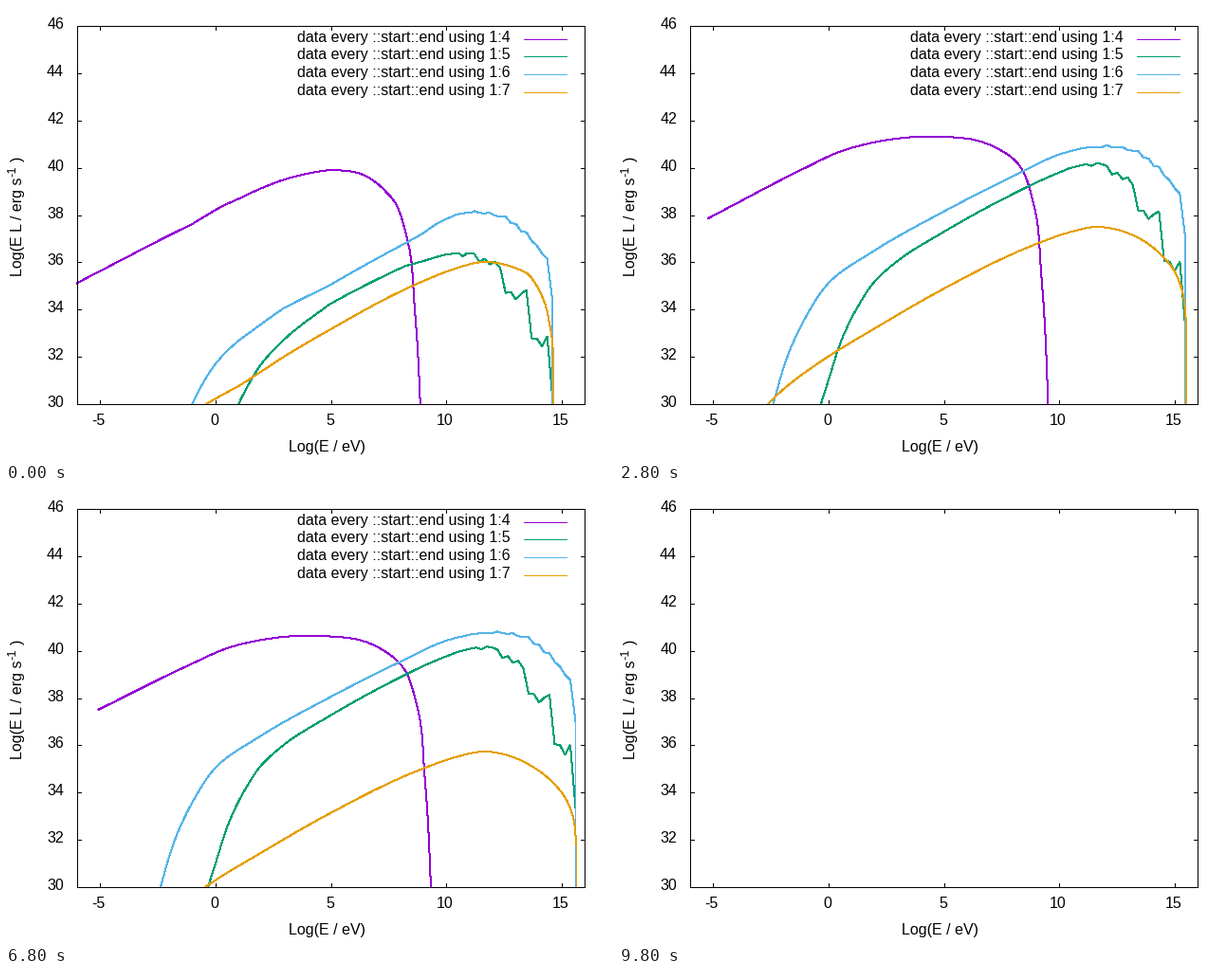
Animation of 640 by 480 pixels, one loop 10 s. Source, as a matplotlib script:

```python
import numpy as np
import matplotlib.pyplot as plt
from matplotlib.animation import FuncAnimation

W, H, DPI = 640, 480, 100
PX = 72 / DPI
FRAMES, STEP = 50, 200
LEFT, RIGHT, TOP, BOTTOM = 74, 609, 20, 419
RISE, REST = 6, 21        # end of the opening rise, frame of the rest shape
GRID = 5.5                # energy step of the ragged edges
EDGE = 598

plt.rcParams.update({"font.family": "Liberation Sans",
                     "font.size": 16 * PX,
                     "path.simplify": False})


def spline(*knots, parts=6):
    """Smooth path through knots given as x, y, x, y, ..."""
    p = np.reshape(knots, (-1, 2)).astype(float)
    t = np.r_[0, np.cumsum(np.hypot(*np.diff(p, axis=0).T))]
    m = np.gradient(p, t, axis=0)
    out = []
    for i, h in enumerate(np.diff(t)):
        s = np.linspace(0, 1, parts, endpoint=False)[:, None]
        out.append((1 + 2 * s) * (1 - s) ** 2 * p[i] + s * (1 - s) ** 2 * h * m[i]
                   + s * s * (3 - 2 * s) * p[i + 1] + s * s * (s - 1) * h * m[i + 1])
    return np.vstack(out + [p[-1:]])


def ragged(*ys):
    xs = EDGE - GRID * np.arange(len(ys))[::-1]
    return np.column_stack([xs, ys])


def edge_shift(n):
    return 9.6 * np.log10((n + 0.1) / (REST + 0.1))


def settle(n):
    return np.exp((RISE - n) / 4)


def fade(n):
    return max(n - REST, 0)


def bend(a, b):
    return lambda n: a * (n - REST) + b * (n - REST) ** 2


def sink(a, b):
    return lambda n: a * settle(n) + b * fade(n)


class Curve:
    """A rest shape, its drop at the start and its later drift."""

    SPOTS = 195, 245, 292, 341, 420, 500, 598

    def __init__(self, color, path, drop, low, high, ramp, dx=edge_shift):
        self.color, self.path, self.drop = color, path, drop
        self.low, self.high, self.ramp, self.dx = low, high, ramp, dx

    def at(self, n):
        x, y = self.path.T
        u = min(1, np.log1p(10 * n) / np.log1p(10 * RISE))
        late = max(n, RISE)
        low, high = self.low(late), self.high(late)
        drift = low + (high - low) * (x - 100) / 400
        dy = (1 - u) * np.interp(x, self.SPOTS, self.drop) + u * drift
        begin, width = self.ramp
        dx = self.dx(n) * np.clip((x - begin) / width, 0, 1)
        start = edge_shift(n) * np.clip((120 - x) / 25, 0, 1)
        x, y = x + dx + start, y + dy - 0.52 * start
        return np.r_[x, x[-1]], np.r_[y, H + 20]


def cutoff_shift(n):
    u = min(1, np.log1p(10 * n) / np.log1p(10 * RISE))
    return -14.5 * (1 - u) - settle(max(n, RISE)) * u - 0.3 * fade(n)


purple = Curve(
    "#9400d3",
    spline(95, 225, 195, 174, 232, 157, 268, 147.5, 330, 142, 390, 151,
           420, 171, 437, 215, 445, 290, 454, 470),
    (56, 50, 39, 30, 30, 30, 30),
    bend(0.44, 0.0158), bend(1.02, 0.0127), (365, 50), cutoff_shift)

green = Curve(
    "#009e73",
    np.vstack([
        spline(208, 432, 220, 394, 236, 346, 252, 314, 268, 290, 292, 268,
               341, 237, 414, 197, 445, 182, 475, 169.5),
        ragged(165, 167, 164, 165, 167, 176, 174, 181, 179, 187, 214, 214,
               223, 218, 215, 267, 268, 278, 268, 334)]),
    (92, 92, 84, 77, 80, 97, 79),
    sink(11, 0.14), sink(9, 0.13), (440, 75))

blue = Curve(
    "#56b4e9",
    np.vstack([
        spline(158, 432, 181, 358, 195, 329, 220, 291, 268, 257, 341, 216,
               420, 176, 463, 156, 489, 149),
        ragged(148, 148, 148, 146, 148, 148.5, 148, 151, 152, 152, 159, 160,
               168, 169, 178, 183, 191.5, 197, 241)]),
    (92, 81, 76, 78, 74, 70, 69),
    sink(11, 0.2), sink(3, 0.28), (440, 75))

orange = Curve(
    "#e69f00",
    spline(128, 465, 171, 419, 220, 383, 268, 354, 341, 312, 438, 265,
           475, 252, 503, 246.5, 536, 253, 572, 276, 588, 296, 595, 314,
           599, 345),
    (29, 33, 30, 29, 26, 23, 22),
    bend(2.04, 0.0159), bend(2.1, 0.0159), (550, 45))

curves = purple, green, blue, orange

fig = plt.figure(figsize=(W / DPI, H / DPI), dpi=DPI, facecolor="white")


def pixel_axes(x0, y0, x1, y1):
    ax = fig.add_axes([x0 / W, 1 - y1 / H, (x1 - x0) / W, (y1 - y0) / H])
    ax.set_xlim(x0, x1)
    ax.set_ylim(y1, y0)
    ax.axis("off")
    return ax


plot = pixel_axes(LEFT, TOP, RIGHT + 1, BOTTOM + 1)
stage = pixel_axes(0, 0, W, H)


def stroke(ax, xs, ys, color="black"):
    return ax.plot(np.add(xs, 0.5), np.add(ys, 0.5), color=color, lw=PX,
                   antialiased=False, solid_joinstyle="miter",
                   solid_capstyle="projecting")[0]


def label(x, y, s, ha="center", **kw):
    return stage.text(x, y, s, ha=ha, va="baseline", **kw)


lines = [stroke(plot, [], [], c.color) for c in curves]

# Border, ticks and tick labels
stroke(stage, [LEFT, RIGHT, RIGHT, LEFT, LEFT], [TOP, TOP, BOTTOM, BOTTOM, TOP])
for v in range(-5, 16, 5):
    x = round(LEFT + (v + 6) * (RIGHT - LEFT) / 22)
    stroke(stage, [x, x], [BOTTOM - 4, BOTTOM])
    stroke(stage, [x, x], [TOP, TOP + 4])
    label(x - (v < 0), 442, str(v))
for v in range(30, 47, 2):
    y = round(BOTTOM - (v - 30) * (BOTTOM - TOP) / 16)
    stroke(stage, [LEFT, LEFT + 4], [y, y])
    stroke(stage, [RIGHT - 4, RIGHT], [y, y])
    label(61, y + 4, str(v), ha="right")

# Axis titles
label(339, 470, "Log(E / eV)")
up = dict(ha="left", rotation=90, rotation_mode="anchor")
label(17, 285, "Log(E L / erg s", **up)
label(10, 180, "-1", fontsize=12.8 * PX, **up)
label(17, 164.4, ")", **up)

key = []
for i, c in enumerate(curves):
    y = round(33.6 + 18.7 * i)
    key.append(label(532, y + 4, f"data every ::start::end using 1:{i + 4}", ha="right"))
    key.append(stroke(stage, [545, 590], [y, y], c.color))


def draw(n):
    for line, c in zip(lines, curves):
        x, y = c.at(n)
        line.set_data(x + 0.5, y + 0.5)
    for artist in lines + key:
        artist.set_visible(n < FRAMES - 1)
    return lines + key


anim = FuncAnimation(fig, draw, frames=FRAMES, interval=STEP,
                     repeat=True, repeat_delay=0, blit=False)
plt.show()
```
